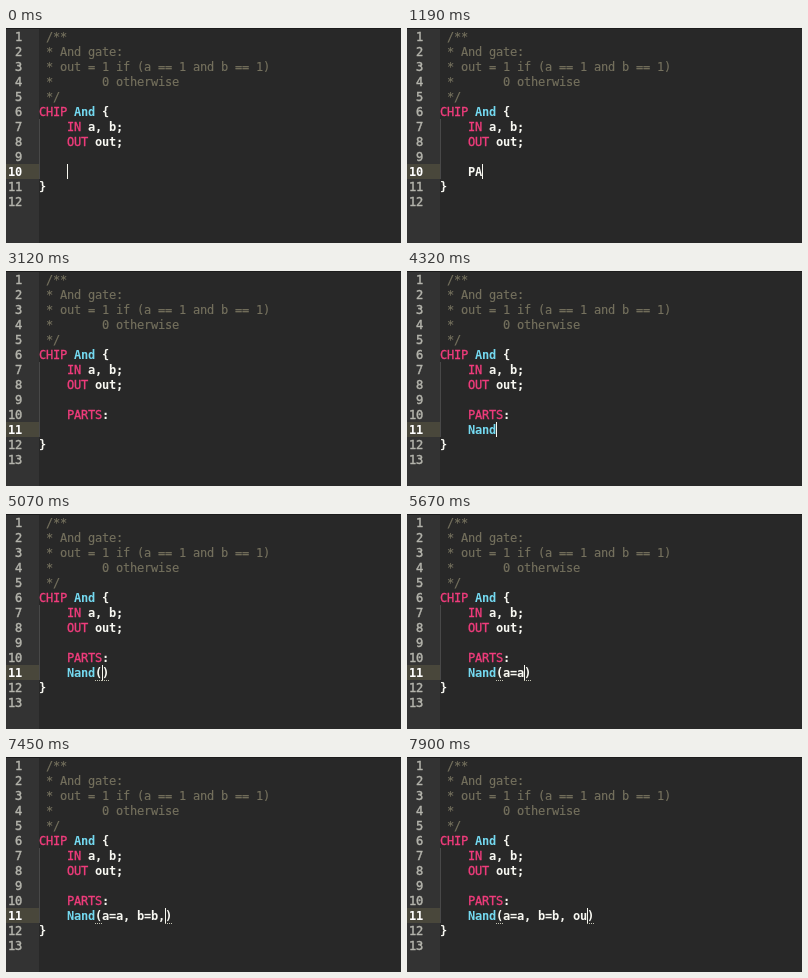
These frames come from a looping animation (395 px wide and 215 px high, 8000 ms). An HTML page:

```html
<!DOCTYPE html>
<html lang="en">
<head>
<meta charset="utf-8">
<title>Typing a chip</title>
<style>
  html, body { margin: 0; width: 100%; height: 100%; overflow: hidden; background: #282828; }
  body {
    position: relative;
    font: 12px/17px "DejaVu Sans Mono", monospace;
    letter-spacing: calc(7px - .60205em);
    font-variant-ligatures: none;
    color: #f8f8f2;
    white-space: pre;
  }
  #gutter {
    position: absolute; left: 0; top: 0; bottom: 0; width: 33px;
    background: #333; color: #b4b4ac;
    -webkit-text-stroke: .45px;
  }
  #gutter div { height: 15px; width: 16px; padding-right: 17px; text-align: right; }
  #gutter div:first-child { margin-top: 1px; }
  #gutter .on { background: #49473b; color: #fff; font-weight: bold; -webkit-text-stroke: 0; }
  #code { position: absolute; left: 33px; top: 1px; font-weight: bold; }
  #code div { height: 15px; }
  #code .body { background: linear-gradient(#484848, #484848) 0 0 / 1px 15px no-repeat; }
  .note { color: #75715e; font-weight: normal; -webkit-text-stroke: .15px; }
  .key { color: #f03c7c; font-weight: normal; -webkit-text-stroke: .3px; }
  .name { color: #74d9f0; }
  .pair {
    display: inline-block; width: 7px; height: 17px; vertical-align: top;
    background: repeating-linear-gradient(90deg, #c4c4b4 0 1px, transparent 1px 2px) 0 15px / 7px 1px no-repeat;
  }
  #caret { position: absolute; width: 1px; height: 15px; background: #f8f8f0; }
  #edge { position: absolute; left: 0; right: 0; top: 0; height: 1px; background: #1c1c1c; }
</style>
</head>
<body>
<div id="gutter"></div>
<div id="code"></div>
<div id="caret"></div>
<div id="edge"></div>
<script>
const LOOP = 8000, CHAR = 7, LINE = 15, LEFT = 61, TOP = 136;
const OFF = "off", ON = "on";

// [time in ms, typed text or caret state]
const events = [
  [140, OFF], [590, ON],
  [890, "P"], [1190, "A"], [1480, "R"], [1630, "T"], [1920, "S"], [2370, ":"],
  [2670, "\n"], [3120, OFF],
  [3420, "N"], [3720, "a"], [3870, "n"], [4320, "d"], [4770, OFF],
  [5070, "("], [5370, "a"], [5520, "="], [5670, "a"],
  [6120, ", "], [6270, "b"], [6420, "="], [6560, "b"], [7150, OFF],
  [7450, ","], [7600, " "], [7750, "o"], [7900, "u"]
];

const $ = id => document.getElementById(id);
const span = (type, text) => `<span class="${type}">${text}</span>`;
const row = (type, text) => `<div class="${type}">${text}</div>`;
const indent = "    ";

const head = [
  ...[" /**", " * And gate:", " * out = 1 if (a == 1 and b == 1)",
      " *       0 otherwise", " */"].map(s => span("note", s)),
  span("key", "CHIP") + " " + span("name", "And") + " {"
];
const ports = [
  indent + span("key", "IN") + " a, b;",
  indent + span("key", "OUT") + " out;",
  ""
];

function paint(line) {
  if (line.includes("(")) line = line.replace("(", span("pair", "(")) + span("pair", ")");
  return indent + line
    .replace(/^PARTS/, s => span("key", s))
    .replace(/^Nand/, s => span("name", s));
}

function stateAt(t) {
  let text = "", caret = true, step = 0;
  for (const [time, what] of events) {
    if (time > t) break;
    step++;
    caret = what !== OFF;
    if (what !== OFF && what !== ON) text += what;
  }
  return { text, caret, step };
}

let shown = -1;
function draw(t) {
  const { text, caret, step } = stateAt(t);
  if (step === shown) return;
  shown = step;

  const typed = text.split("\n");
  const body = [...ports, ...typed.map(paint)];
  const rows = [
    ...head.map(s => row("", s)),
    ...body.map(s => row("body", s)),
    row("", "}"), row("", "")
  ];
  const active = head.length + body.length;
  $("code").innerHTML = rows.join("");
  $("gutter").innerHTML = rows.map((_, i) => row(i + 1 === active ? "on" : "", i + 1)).join("");

  const style = $("caret").style;
  style.left = LEFT + CHAR * typed[typed.length - 1].length + "px";
  style.top = TOP + LINE * (typed.length - 1) + "px";
  style.visibility = caret ? "visible" : "hidden";
}

const start = performance.now();
function tick() {
  draw((performance.now() - start) % LOOP);
  requestAnimationFrame(tick);
}
tick();
</script>
</body>
</html>
```
